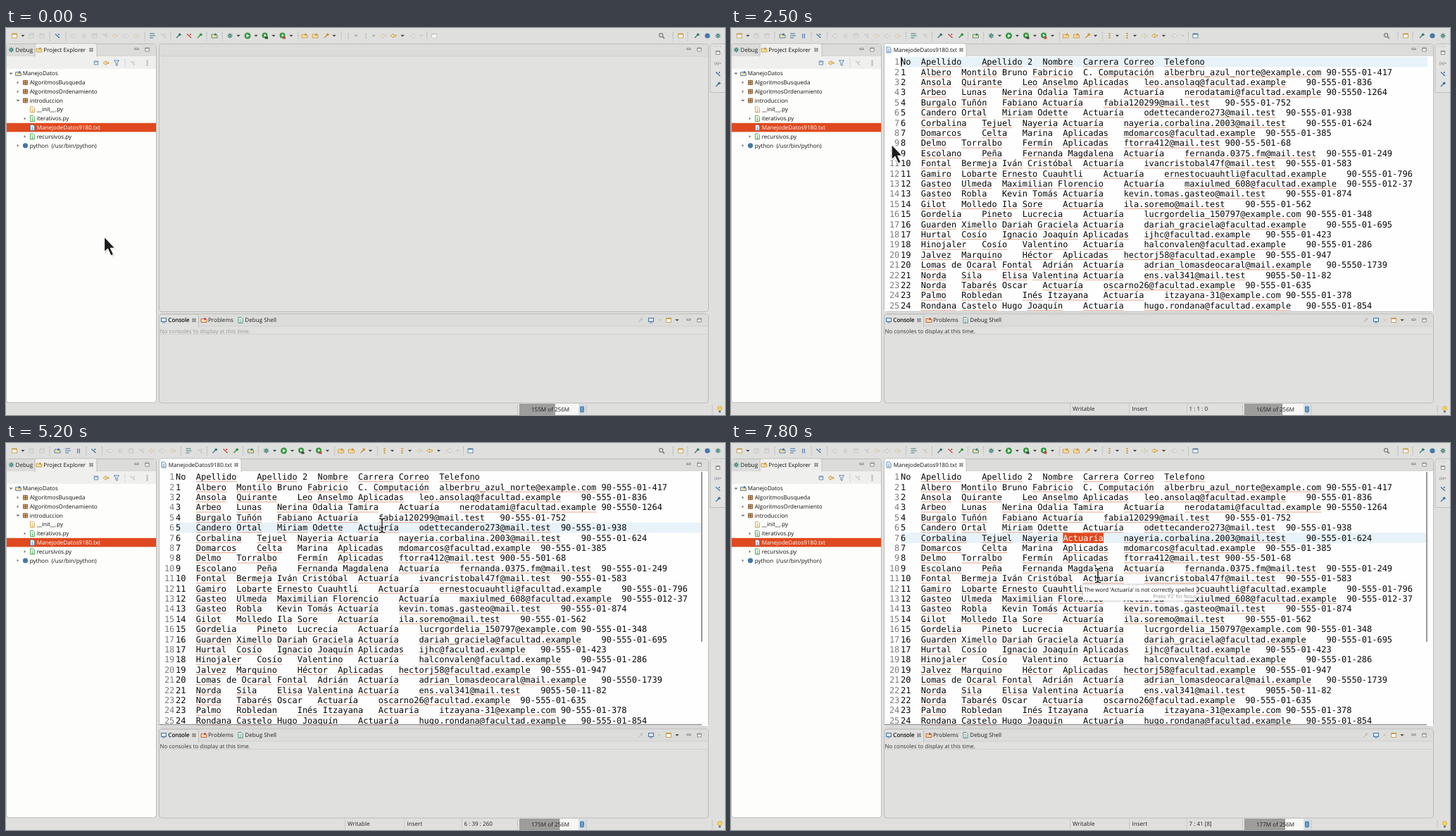
An HTML page for the animation above (8000 ms loop, 1021x549 px).

```html
<!DOCTYPE html>
<html lang="es">
<head>
<meta charset="utf-8">
<title>Editor</title>
<style>
html,body{margin:0;width:100%;height:100%;overflow:hidden;background:#dfdfde}
svg{display:block;width:100vw;height:100vh;text-rendering:geometricPrecision}
text{font-family:"Open Sans","Noto Sans",sans-serif;font-size:8.08px;white-space:pre}
.code text{font-family:"DejaVu Sans Mono",monospace;font-size:11.96px}
</style>
</head>
<body>
<svg id="stage" viewBox="0 0 1021 549" preserveAspectRatio="none"></svg>
<script>
const LOOP = 8000, CHAR = 7.2, LINE = 14.404, LEFT = 241, TOP = 41;
const stage = document.getElementById('stage');

const rows = `No|Apellido|Apellido 2|Nombre|Carrera|Correo|Telefono
1|Albero|Montilo|Bruno Fabricio|C. Computación|alberbru_azul_norte@example.com|90-555-01-417
2|Ansola|Quirante|Leo Anselmo|Aplicadas|leo.ansolaq@facultad.example|90-555-01-836
3|Arbeo|Lunas|Nerina Odalia Tamira|Actuaría|nerodatami@facultad.example|90-5550-1264
4|Burgalo|Tuñón|Fabiano|Actuaría|fabia120299@mail.test|90-555-01-752
5|Candero|Ortal|Miriam Odette|Actuaría|odettecandero273@mail.test|90-555-01-938
6|Corbalina|Tejuel|Nayeria|Actuaría|nayeria.corbalina.2003@mail.test|90-555-01-624
7|Domarcos|Celta|Marina|Aplicadas|mdomarcos@facultad.example|90-555-01-385
8|Delmo|Torralbo|Fermín|Aplicadas|ftorra412@mail.test|900-55-501-68
9|Escolano|Peña|Fernanda Magdalena|Actuaría|fernanda.0375.fm@mail.test|90-555-01-249
10|Fontal|Bermeja|Iván Cristóbal|Actuaría|ivancristobal47f@mail.test|90-555-01-583
11|Gamiro|Lobarte|Ernesto Cuauhtli|Actuaría|ernestocuauhtli@facultad.example|90-555-01-796
12|Gasteo|Ulmeda|Maximilian Florencio|Actuaría|maxiulmed_608@facultad.example|90-555-012-37
13|Gasteo|Robla|Kevin Tomás|Actuaría|kevin.tomas.gasteo@mail.test|90-555-01-874
14|Gilot|Molledo|Ila Sore|Actuaría|ila.soremo@mail.test|90-555-01-562
15|Gordelia|Pineto|Lucrecia|Actuaría|lucrgordelia_150797@example.com|90-555-01-348
16|Guarden|Ximello|Dariah Graciela|Actuaría|dariah_graciela@facultad.example|90-555-01-695
17|Hurtal|Cosío|Ignacio Joaquín|Aplicadas|ijhc@facultad.example|90-555-01-423
18|Hinojaler|Cosío|Valentino|Actuaría|halconvalen@facultad.example|90-555-01-286
19|Jalvez|Marquino|Héctor|Aplicadas|hectorj58@facultad.example|90-555-01-947
20|Lomas de Ocaral|Fontal|Adrián|Actuaría|adrian_lomasdeocaral@mail.example|90-5550-1739
21|Norda|Sila|Elisa Valentina|Actuaría|ens.val341@mail.test|9055-50-11-82
22|Norda|Tabarés|Oscar|Actuaría|oscarno26@facultad.example|90-555-01-635
23|Palmo|Robledan|Inés Itzayana|Actuaría|itzayana-31@example.com|90-555-01-378
24|Rondana|Castelo|Hugo Joaquín|Actuaría|hugo.rondana@facultad.example|90-555-01-854`
  .split('\n').map(r => r.split('|').reduce((line, cell) => line.padEnd((line.length >> 2) * 4 + 4) + cell));

const colors = {
  k: '#444', d: '#777', y: '#c9983c', g: '#35983f', b: '#4478a8', x: '#c5c5c4', m: '#a6a6a5',
  r: '#c94a3c', t: '#3d8178', w: '#7c5432'
};

// $ stands for the icon colour
const shapes = {
  w: '<path d="M-3.5-3h7v6h-7z" fill="#fafaf6" stroke="$"/><path d="M-3.5-2.300h7" stroke="$" stroke-width="1.500"/>',
  v: '<path d="M-2.600-1.200h5.200L0 1.600z" fill="$"/>',
  d: '<path d="M0-5.500V6.500" stroke="$" stroke-width="1.200" stroke-dasharray="1.200 1.600"/>',
  b: '<path d="M-3-3h6v6h-6zM-1.500-3v2h3v-2" fill="none" stroke="$"/>',
  o: '<circle r="3.600" fill="$"/>',
  p: '<circle r="4.500" fill="$"/><path d="M-1.500-2.500L2.700 0l-4.200 2.500z" fill="#fff"/>',
  h: '<circle r="4" cx="-.5" cy="-.5" fill="#35983f"/><path d="M-1.500-2.500L2 -.5l-3.500 2z" fill="#fff"/><path d="M0 1.500h4v3H0z" fill="$"/>',
  g: '<path d="M-4 0h8M0-4v8M-3-3l6 6M3-3l-6 6" stroke="$"/><circle r="2.400" fill="$"/><circle r=".8" fill="#eee"/>',
  f: '<path d="M-4-2h3l1 1h4v4h-8z" fill="#f4dca0" stroke="$"/><circle cx="1.500" cy="-2" r="1.600" fill="$"/>',
  l: '<path d="M-4-3h7M-4 0h8M-4 3h5" stroke="$" stroke-width="1.100"/>',
  a: '<path d="M-4 0L0-3v2h4v2H0v2z" fill="#f6e5b0" stroke="$"/>',
  s: '<path d="M4 0L0-3v2h-4v2h4v2z" fill="#eee" stroke="$"/>',
  z: '<path d="M-3-2.500L3 3" stroke="$" stroke-width="1.400"/><circle cx="1.800" cy="-1.800" r="1.100" fill="$"/>',
  n: '<path d="M-3 3L2-2" stroke="$" stroke-width="1.500"/><circle cx="1.700" cy="-1.700" r="1.900" fill="$"/>',
  i: '<path d="M-1.300-3v6.500M1.300-3v6.500" stroke="$" stroke-width="1.100"/>',
  q: '<circle cx="-.8" cy="-.8" r="2.600" fill="none" stroke="$" stroke-width="1.100"/><path d="M1.200 1.200l2.800 2.800" stroke="$" stroke-width="1.500"/>',
  e: '<path d="M-2.700-1.700h5.400v1.800h-5.400z" fill="#f4f4f3" stroke="$"/>',
  u: '<path d="M-2.700-2.500h5.400v5h-5.400z" fill="#fff" stroke="$"/><path d="M-2.700-1.300h5.400" stroke="$"/>',
  c: '<path d="M-2.300-2.300l4.600 4.600M2.300-2.300l-4.600 4.600" stroke="#666" stroke-width="2.100"/><path d="M-2-2l4 4M2-2l-4 4" stroke="#eee" stroke-width=".7"/>',
  j: '<path d="M-3-4h4l2 2v6h-6z" fill="#fff" stroke="$"/><path d="M-1.500-1h3M-1.500 1h3M-1.500 2.600h3" stroke="$" stroke-width=".7"/>',
  k: '<path d="M-3-3h6v6h-6z" fill="#dca56c" stroke="$"/><path d="M-3 0h6M0-3v6" stroke="$"/>',
  x: '<path d="M-1.300-2L1.200 0l-2.500 2z" fill="$"/>',
  y: '<path d="M-3.500-3.500h7L1 0v4l-2-1V0z" fill="#e9f0f8" stroke="$"/>',
  m: '<path d="M-3.500-3h7v5h-7z" fill="#dbe8f4" stroke="$" stroke-width="1.100"/><path d="M-2 3.500h4" stroke="$"/>',
  t: '<path d="M0-4v8" stroke="$" stroke-width="2" stroke-dasharray="2 1"/>'
};

const icon = (kind, x, y, color) =>
  `<g transform="translate(${x} ${y})" stroke-width=".85">${shapes[kind].replaceAll('$', colors[color])}</g>`;
const icons = (list, y, shift = 0) =>
  list.replace(/(\w)([\d.]+)(\w)\s*/g, (_, kind, x, color) => icon(kind, +x + shift, y, color));
const text = (x, y, str, fill = '#222', extra = '') =>
  `<text x="${x}" y="${y}" fill="${fill}" ${extra}>${str}</text>`;
const rect = (x, y, w, h, fill, extra = '') =>
  `<rect x="${x}" y="${y}" width="${w}" height="${h}" fill="${fill}" ${extra}/>`;
const group = (id, body, extra = '') => `<g id="${id}" ${extra}>${body}</g>`;
const lineTop = i => TOP + i * LINE;
const baseline = i => lineTop(i) + 11.2;

const panel = (x, y, w, h, body) =>
  rect(x + .5, y + .5, w - 1, h - 1, body, 'rx="4" stroke="#bcbcbb"') +
  `<path d="M${x + 1} ${y + 18}V${y + 5}q0-4 4-4h${w - 10}q4 0 4 4v13z" fill="#dcdcdb"/>` +
  `<path d="M${x} ${y + 18}h${w}" stroke="#c9c9c8" stroke-width=".7"/>`;
const tab = (x, y, w, fill) =>
  `<path d="M${x} ${y + 19}V${y + 3}q0-3 3-3h${w - 6}q3 0 3 3v16" fill="${fill}" stroke="#b8b8b7" stroke-width=".8"/>`;

function toolbar(open) {
  const c = open ? 'k' : 'm', on = open ? 'y' : 'x', shift = open ? 51.5 : 0;
  return icons('w12y v24k b36x b51x d62m', 11) +
    (open ? icons('f73b l88b i103b d114m', 11) : '') +
    icons(`z73b d85m s96x i111x b126x z141x a155x s170x a185x d197m l208t z224x d234m n245t z260r n275g d285m
      f296t d307m g318t v330k p343g v355k h368k v380k h393r v405k d415m f424y f439y n455y v466k d476m
      t486${on} v497${c} t511${on} v522${c} a536x a550y v563k s578x v590x d598m`, 11, shift);
}

function tree() {
  const items = [
    [24, 'ManejoDatos', 'f', 'b', 'v'], [34, 'AlgoritmosBusqueda', 'k', 'w', 'x'],
    [34, 'AlgoritmosOrdenamiento', 'k', 'w', 'x'], [34, 'introduccion', 'k', 'w', 'v'],
    [44, '__init__.py', 'j', 'y', ''], [44, 'iterativos.py', 'j', 'g', 'x'],
    [44, 'ManejodeDatos9180.txt', 'j', 'b', ''], [44, 'recursivos.py', 'j', 'g', 'x'],
    [34, 'python  (/usr/bin/python)', 'o', 'b', 'x']];
  return items.map(([x, name, kind, color, fold], i) => {
    const y = 64.6 + i * 12.77;
    return (fold ? icon(fold, x - 17, y, 'd') : '') + icon(kind, x - 6.5, y, color) +
      text(x - .3, y + 2.8, name, i === 6 ? '#fff' : '#111');
  }).join('');
}

const underlines = rows.map((row, i) =>
  [...row.matchAll(/\S+/g)].filter(m => /^[^\d\s]{2}/.test(m[0]) && !/^(de|No|C\.|Bruno|Kevin|Hugo|Marina|Oscar)$/.test(m[0]))
    .map(m => `M${LEFT + m.index * CHAR} ${baseline(i) + 2.6}h${m[0].length * CHAR}`).join('')).join('');

const lines = rows.map((row, i) =>
  text(239.3, baseline(i), i + 1, '#7b7b7b', 'text-anchor="end"') + text(LEFT, baseline(i), row, '#080808')).join('');

stage.innerHTML =
  rect(0, 0, 1021, 549, '#dfdfde') +
  group('idleBar', toolbar(false)) + group('openBar', toolbar(true)) +
  group('pinOff', icon('w', 608, 11, 'x')) + group('pinOn', icon('w', 659.5, 11, 'b')) +
  icons('q931d d947m w958y d968m n981t o996b g1011t', 11) +
  // side panel
  panel(0, 22, 214, 510, '#fdfdfb') + rect(1, 40, 212, 18, '#efefee') + tab(41, 22, 88, '#efefee') +
  icons('g7.5t f47y c121k', 31) + icons('e185.5d u200.5d', 30.5) +
  text(13.5, 33.7, 'Debug') + text(53.3, 33.7, 'Project Explorer', '#111') +
  icons('u128b a142y y157b d169x z180x t200.5m', 49.5) +
  rect(1, 134.8, 212, 12.6, '#df491f') +
  group('focus', rect(1.5, 135.3, 211, 11.6, 'none', 'stroke="#f3b7a3"')) + tree() +
  // editor
  panel(217, 22, 781, 381, '#e1e1e0') +
  group('editor',
    rect(218, 40, 779, 362, '#fefefe') + tab(217.5, 22, 116.5, '#fefefe') +
    icons('j224b c327k', 31) + text(230.7, 33.7, 'ManejodeDatos9180.txt', '#111') +
    rect(LEFT, 0, 748, LINE, '#e7f2f9', 'id="current"') +
    `<path id="spell" d="${underlines}" stroke="#e59a7e" stroke-width=".9"/>` +
    group('code', lines, 'class="code"') +
    group('picked', rect(0, 0, 8 * CHAR, LINE, '#df491f') + text(0, 11.2, 'Actuaría', '#fff'), 'class="code"') +
    rect(0, 0, 1.2, 13.5, '#111', 'id="caret"') +
    group('bars', rect(987, 41, 2, 241, '#999') + rect(218, 398.8, 770, 1.8, '#999')) +
    group('tip', rect(497, 198.5, 167, 28, '#000', 'opacity=".05" rx="3"') +
      rect(498.8, 200.3, 163.5, 24.5, '#000', 'opacity=".08" rx="2"') +
      rect(500, 201.5, 161, 22, '#fdfdfd', 'rx="1"') +
      text(501.3, 210.7, "The word 'Actuaría' is not correctly spelled", '#111', 'style="font-size:8px"') +
      text(660.5, 219.7, "Press 'F2' for focus", '#8c8c8c', 'text-anchor="end" style="font-size:7px"'))) +
  icons('e969.5d u984.5d', 30.5) +
  // console
  panel(217, 405, 781, 127.5, '#e0e0df') + tab(217.5, 406, 56, '#e0e0df') +
  icons('m224b c267k f281r j333t n901x m916b v928x w941y v953k e969.5d u984.5d', 414.5) +
  text(230.3, 417.4, 'Console', '#111', 'stroke="#111" stroke-width=".2"') +
  text(287, 417.4, 'Problems') + text(339.3, 417.4, 'Debug Shell') +
  text(218.5, 432.6, 'No consoles to display at this time.', '#999', 'id="empty" style="font-size:7.95px"') +
  '<path d="M218 434.5h779" stroke="#cfcfce" stroke-width=".8"/>' +
  // right trim
  '<path d="M1021 22.5h-16q-5 0-5 5v64h21" fill="#e2e2e1" stroke="#c0c0bf"/>' +
  '<path d="M1005 26h12" stroke="#aaa" stroke-dasharray="1 2"/>' +
  icon('u', 1011, 35, 'd') + text(1006, 52, '(x)=', '#567', 'style="font-size:5.8px"') +
  icon('z', 1011, 65, 'b') + icon('n', 1011, 80, 'b') +
  // status line
  group('status', '<path d="M481.5 533v15M565.5 533v15M647.5 533v15" stroke="#cbcbca"/>' +
    text(485, 543.2, 'Writable') + text(569.5, 543.2, 'Insert') + text(650.5, 543.2, '', '#222', 'id="place"')) +
  icons('d726.5m d824m d1003m', 541) + rect(729, 533, 84, 16, '#f6f6f5') +
  rect(729, 533, 50, 16, '#9d9d9c', 'id="heap"') + text(746, 544, '', '#222', 'id="heapText"') +
  rect(813.5, 533, 9, 16, '#d5dfe8') + rect(815.5, 537, 5, 8, '#6f9ac2', 'rx="1" stroke="#3d6a94" stroke-width=".8"') +
  '<circle cx="1013.5" cy="539.5" r="3" fill="#f7d560" stroke="#c9a030" stroke-width=".7"/>' +
  rect(1012, 543, 3, 2.5, '#777') +
  // pointers
  group('arrow', '<path d="M0 0V22.5L5 18l4.5 9.5 4-2L9.2 16.5H16z" fill="#000" opacity=".18" transform="translate(1 1)"/>' +
    '<path d="M0 0V22L5 17.5l4.5 9.5 3.7-1.8L9 16.3h6.5z" fill="#1c1c1c" stroke="#fff" stroke-width="1.2"/>') +
  group('beam', ['#fff" stroke-width="3.4', '#1c1c1c" stroke-width="1.5'].map(s =>
    `<path d="M-4-10q4 0 4 2.500V7.500Q0 10-4 10M4-10q-4 0-4 2.500M0 7.500Q0 10 4 10M-2.500 3h5" fill="none" stroke="${s}"/>`).join(''));

const $ = id => document.getElementById(id);
const show = (id, on) => $(id).setAttribute('display', on ? 'inline' : 'none');
const move = (id, x, y) => $(id).setAttribute('transform', `translate(${x} ${y})`);
const latest = (list, t) => list.filter(s => s[0] <= t).pop()[1];

const heapSteps = [[0, 155], [1400, 156], [2100, 160], [2500, 165], [2900, 168], [3300, 171], [3800, 174], [4600, 175], [5300, 176], [6800, 177]];
const places = [[0, '1 : 1 : 0'], [4200, '5 : 33 : 201'], [5200, '6 : 39 : 260'], [5300, '6 : 45 [8]'], [6600, '7 : 36 : 298'], [6800, '7 : 41 [8]']];
const currentLine = [[0, 0], [4000, 4], [5200, 5], [6500, 6]];
// from, to, column, line
const carets = [[1800, 2900, 0, 0], [3400, 4000, 0, 0], [4000, 4600, 32, 4], [5300, 5700, 44, 5], [6800, 7300, 40, 6]];
const picks = [[5300, 6500, 36, 5], [6800, LOOP, 32, 6]];
const path = [[0, 139.5, 296], [500, 139.5, 296], [900, 104.5, 152], [1000, 104.5, 152], [1100, 103.5, 141], [2000, 103.5, 141],
  [2300, 146, 152], [2400, 146, 152], [2500, 228, 165], [2900, 330, 320], [3300, 425, 378], [3600, 469, 98], [3700, 469, 98],
  [3800, 475, 102], [4500, 475, 102], [4800, 533, 115], [4900, 533, 115], [5000, 534, 117], [5500, 534, 117],
  [5800, 502, 131], [6300, 502, 131], [6400, 487, 135], [7100, 487, 135], [7400, 521, 188], [LOOP, 521, 188]];

function pointer(t) {
  const i = path.findIndex(p => p[0] > t), [t0, x0, y0] = path[i - 1], [t1, x1, y1] = path[i];
  const k = (t - t0) / (t1 - t0);
  return [x0 + (x1 - x0) * k, y0 + (y1 - y0) * k];
}

function mark(id, spans, t, dx = 0) {
  const span = spans.find(s => s[0] <= t && t < s[1]);
  show(id, span);
  if (span) move(id, LEFT + dx + span[2] * CHAR, lineTop(span[3]));
}

function draw(now) {
  const t = Math.floor(now % LOOP / 100) * 100, open = t >= 1700;
  show('idleBar', !open);
  show('openBar', open);
  show('pinOff', !open);
  show('pinOn', t >= 1800);
  show('editor', open);
  show('status', open);
  show('focus', t >= 1300 && !open);
  show('spell', t >= 2100);
  show('bars', t >= 2700);
  show('tip', t >= 7800);
  $('empty').setAttribute('fill', open ? '#333' : '#999');
  $('current').setAttribute('y', lineTop(latest(currentLine, t)));
  mark('picked', picks, t);
  mark('caret', carets, t, .3);
  const heap = latest(heapSteps, t);
  $('heap').setAttribute('width', 84 * heap / 256);
  $('heapText').textContent = heap + 'M of 256M';
  $('place').textContent = latest(places, t);
  const [x, y] = pointer(t), beam = x > LEFT;
  show('beam', beam);
  show('arrow', !beam);
  move(beam ? 'beam' : 'arrow', x, y);
}

function tick() {
  draw(performance.now());
  requestAnimationFrame(tick);
}
tick();
</script>
</body>
</html>
```
